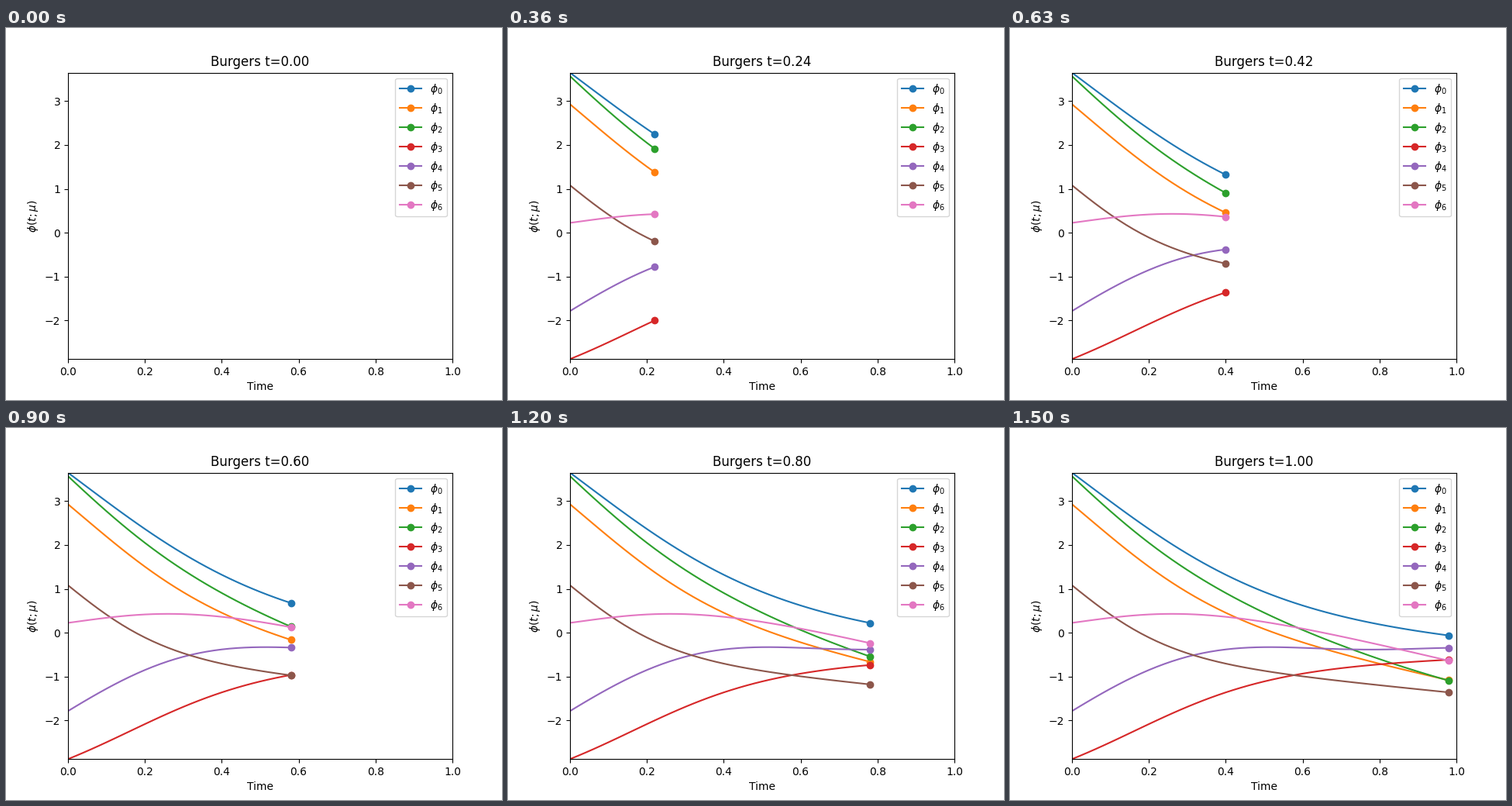
Write a matplotlib script that moves like this. It is 640 by 480 pixels and loops after 1.53 s.

```python
import matplotlib.pyplot as plt
import numpy as np
from matplotlib.animation import FuncAnimation

FRAMES = 51
DT = 0.02

times = np.arange(FRAMES) * DT


def decay(amount, rate, centre):
    """Smooth step that slows down the further it is from its centre."""
    return amount * np.tanh(rate * (times - centre))


t = times
modes = [
    3.41 - 0.6 * t - decay(3.03, 1.97, 0.04),
    2.726 - 1.9 * t - decay(1.966, 2.8, 0.037),
    3.553 - 4.9 * t + 1.25 * t**2 - decay(1.048, 3.15, 0.005),
    -2.2955 + 0.29 * t + decay(1.428, 2.72, 0.16),
    -1.729 + 4.06 * t - 2.66 * t**2 + 0.204 * np.cos(6.5 * (t - 0.285)),
    1.207 - 0.87 * t - decay(1.716, 3.65, -0.02),
    0.291 - 2.1 * t + decay(1.138, 2.9, 0.02),
]

fig, ax = plt.subplots(figsize=(6.4, 4.8), dpi=100)
ax.set_xlim(0, 1)
ax.set_ylim(-2.8805, 3.6495)
ax.set_xlabel("Time")
ax.set_ylabel(r"$\phi(t;\mu)$")
title = ax.set_title("Burgers t=0.00")
lines = [
    ax.plot([], [], "o-", markevery=[-1], label=rf"$\phi_{i}$")[0]
    for i in range(len(modes))
]
ax.legend(loc="upper right")


def update(n):
    title.set_text(f"Burgers t={n * DT:.2f}")
    for line, mode in zip(lines, modes):
        line.set_data(times[:n], mode[:n])
        line.set_visible(n > 0)
    return [title, *lines]


anim = FuncAnimation(fig, update, frames=FRAMES, interval=30,
                     repeat=True, repeat_delay=0)
plt.show()
```
